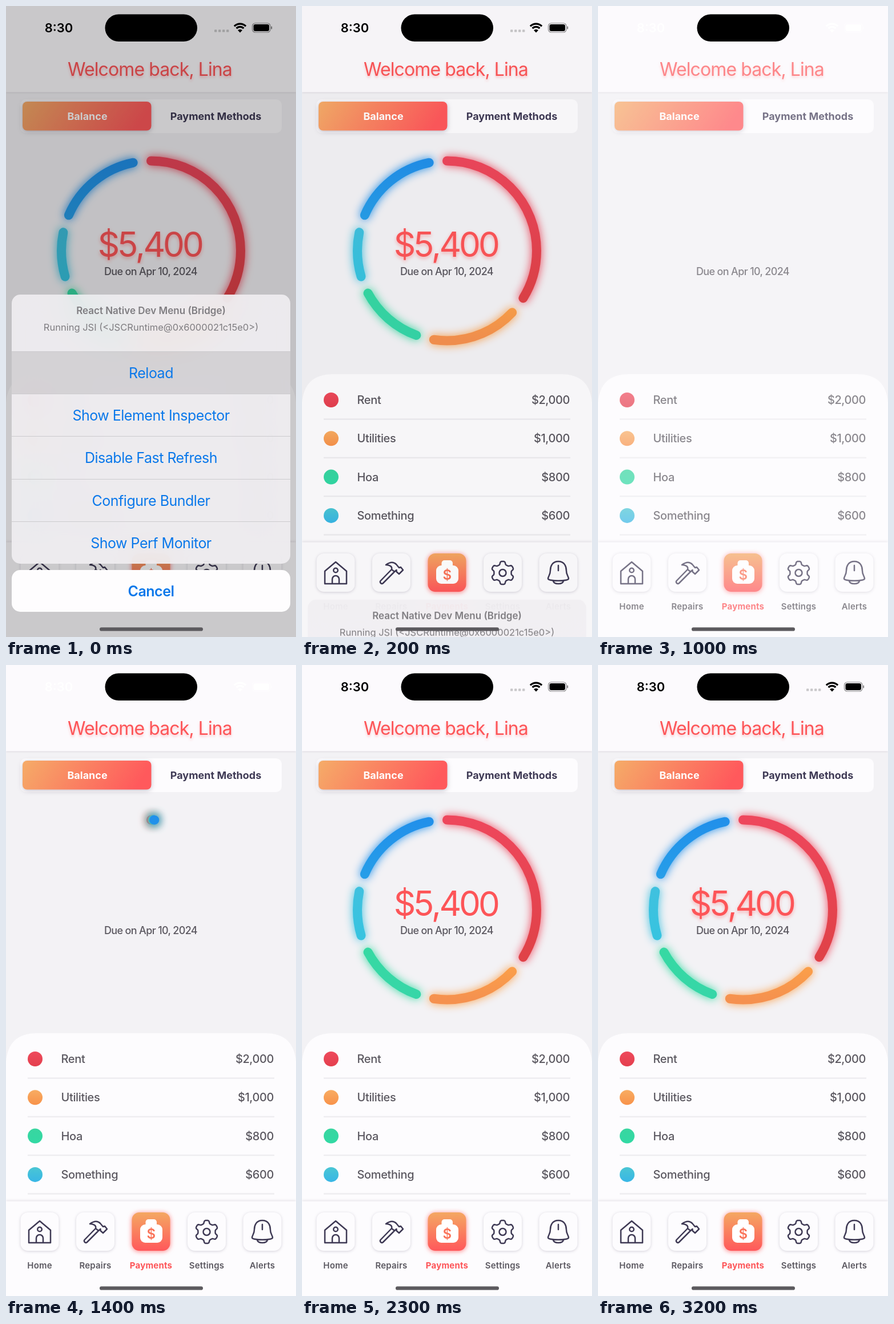
Write an HTML page that moves like this. It is 508 px wide and 1102 px high and loops after 3400 ms.

```html
<!DOCTYPE html>
<html lang="en">
<head>
<meta charset="utf-8">
<title>Payments</title>
<style>
html, body { margin: 0; width: 100%; height: 100%; overflow: hidden; background: #fdfcfe; }
body, text { font-family: Inter, Roboto, sans-serif; }
svg { position: absolute; left: 0; top: 0; width: 508px; height: 1102px; }
#sheet { position: absolute; left: 10px; top: 504px; width: 488px; text-align: center; }
#menu, #cancel { border-radius: 15px; overflow: hidden; }
#menu { height: 470px; background: rgba(241,239,242,.9); backdrop-filter: blur(26px) saturate(1.5); }
#head { height: 99px; color: #7f7d81; font-size: 16.5px; line-height: 29px; white-space: nowrap; }
#head b { display: block; padding-top: 14px; font-size: 17px; font-weight: 600; }
.row, #cancel { height: 73.2px; line-height: 75px; font-size: 25px; letter-spacing: -.5px; color: #0a78ea; }
.row { border-top: 1px solid #cccbce; }
.row.on { background: rgba(0,0,0,.1); }
#cancel { margin-top: 11px; background: #fefdfe; font-weight: 600; }
</style>
</head>
<body>
<svg id="app" viewBox="0 0 508 1102"></svg>
<div id="sheet">
  <div id="menu">
    <div id="head"><b>React Native Dev Menu (Bridge)</b>Running JSI (&lt;JSCRuntime@0x6000021c15e0&gt;)</div>
    <div class="row on">Reload</div>
    <div class="row">Show Element Inspector</div>
    <div class="row">Disable Fast Refresh</div>
    <div class="row">Configure Bundler</div>
    <div class="row">Show Perf Monitor</div>
  </div>
  <div id="cancel">Cancel</div>
</div>
<svg id="top" viewBox="0 0 508 1102"></svg>
<script>
const LOOP = 3400, RED = '#fd5558', INK = '#3f3a55', GREY = '#5b5860', PAPER = '#fdfcfe';
const $ = id => document.getElementById(id);
const clamp = v => Math.max(0, Math.min(1, v));
const span = (t, start, length) => clamp((t - start) / length);
const inOut = v => v < .5 ? 2 * v * v : 1 - 2 * (1 - v) ** 2;
const easeOut = v => 1 - (1 - v) ** 3;

const text = (x, y, s, size, weight, fill, anchor = 'middle', gap = 0, extra = '') =>
  `<text x="${x}" y="${y}" font-size="${size}" font-weight="${weight}" fill="${fill}" text-anchor="${anchor}" letter-spacing="${gap}" ${extra}>${s}</text>`;
const rect = (x, y, w, h, r, fill, extra = '') =>
  `<rect x="${x}" y="${y}" width="${w}" height="${h}" rx="${r}" fill="${fill}" ${extra}/>`;
const shadow = (y, blur, color) => `style="filter:drop-shadow(0 ${y}px ${blur}px ${color})"`;
const gradient = (id, from, to, dir = 'x2="0" y2="1"', a = 0, b = 1) =>
  `<linearGradient id="${id}" ${dir}><stop offset="${a}" stop-color="${from}"/><stop offset="${b}" stop-color="${to}"/></linearGradient>`;

// name, amount, arc colours with their stops down the ring, dot colours
const bills = [
  ['Rent', 2000, ['#ee475c', '#e04248', 0, .75], ['#ee4a5c', '#e43f4e']],
  ['Utilities', 1000, ['#fb9f49', '#f5914f', .82, 1], ['#f8ac62', '#f8924a']],
  ['Hoa', 800, ['#36d9a2', '#36d6a8', .7, 1], ['#38d6a0', '#32d9a4']],
  ['Something', 600, ['#3fc1df', '#35c4e0', .4, .7], ['#4ac6d4', '#38b6e6']],
  ['', 1000, ['#2190ea', '#28a2e8', 0, .42], null]
];
const total = bills.reduce((sum, b) => sum + b[1], 0), GAP = 11.5;
let turn = 0;
const arcs = bills.map(([, amount]) => {
  const size = 360 * amount / total, arc = { start: turn, length: size - GAP };
  turn += size;
  return arc;
});

// counter columns: centre x and target character
const columns = [[180, '$'], [213.5, '5'], [235.5, ','], [260, '4'], [294, '0'], [328, '0']];
const LINE = 70, BASE = 438;
const counter = columns.map(([x, c]) => {
  const chars = c >= '0' ? [...'0123456789'].slice(0, +c + 1) : [c];
  return `<g class="col">${chars.map((d, k) => text(x, BASE + LINE * k, d, 60, 400, RED)).join('')}</g>`;
}).join('');

let gear = '';
for (let i = 0; i < 120; i++) {
  const a = i * Math.PI / 60, r = 17.6 + 2.6 * Math.tanh(2.2 * Math.cos(6 * a));
  gear += `${i ? 'L' : 'M'}${(351.5 + r * Math.sin(a)).toFixed(1)} ${(990 - r * Math.cos(a)).toFixed(1)}`;
}
const tabs = [
  ['Home', '<path d="M40 1009V987L59 971 78 987V1009ZM53 1009V1001a6 6 0 0 1 12 0V1009"/><circle cx="59" cy="985.5" r="3.8"/>'],
  ['Repairs', '<path d="M157 984L137.5 1004Q136 1006 138 1008Q140 1010 142 1008L162 988M147 976Q158 968 165 975L170 981 173 980 177 985 170 992 165.500 988V985L162 988 157 984Q159 977 147 976Z"/>'],
  ['Payments', `<g stroke="none">${rect(235, 977, 39, 32, 9, '#fff')}${rect(244.5, 968, 19.5, 17, 5, '#fff')}${text(254.3, 1002, '$', 24, 600, '#fa7459')}</g>`],
  ['Settings', `<path d="${gear}Z"/><circle cx="351.5" cy="990" r="6"/>`],
  ['Alerts', '<path d="M449 970c-11 0-14 9-14 16c0 8-4 10-4 14c0 5 36 5 36 0c0-4-4-6-4-14c0-7-3-16-14-16ZM440 1004q1 5 9 5t9-5M449 977v9"/>']
];
const tabBar = tabs.map(([name, icon], i) => {
  const x = 59 + 97.5 * i, on = i === 2;
  return rect(x - 33.5, 956, 67, 67, 13, on ? 'url(#tab)' : PAPER,
      on ? shadow(1, 4, 'rgba(255,85,85,.75)') : shadow(1, 2.5, 'rgba(70,60,90,.22)')) +
    `<g fill="none" stroke="${INK}" stroke-width="2.5" stroke-linejoin="round" stroke-linecap="round">${icon}</g>` +
    text(x, 1054, name, 15, on ? 700 : 600, on ? RED : GREY, 'middle', .2);
}).join('');

const rows = bills.slice(0, 4).map(([name, amount], i) => {
  const y = 688 + 67.3 * i;
  return `<circle cx="51" cy="${y}" r="13" fill="url(#dot${i})"/>` +
    text(96.5, y + 7, name, 20, 500, GREY, 'start', -.35) +
    text(469, y + 7, '$' + amount.toLocaleString('en-US'), 20, 500, GREY, 'end', -.4) +
    rect(38, y + 32.4, 432, 2.4, 0, '#eeedf0');
}).join('');

const ring = bills.map((b, i) =>
  `<path class="arc" d="M254 270.500a157 157 0 0 1 0 314a157 157 0 0 1 0-314" pathLength="360" fill="none"
    stroke="url(#arc${i})" stroke-width="16" stroke-linecap="round" ${shadow(0, 8, b[2][0])}/>`).join('');

$('app').innerHTML = `<defs>
  ${bills.map((b, i) => gradient('arc' + i, b[2][0], b[2][1], 'x2="0" y2="1"', b[2][2], b[2][3]) +
    (b[3] ? gradient('dot' + i, ...b[3]) : '')).join('')}
  ${gradient('tab', '#f4a862', '#ff585b')}${gradient('pill', '#f5ac68', '#ff595c', 'x2="1" y2=".15"')}
  <clipPath id="window"><rect x="150" y="380" width="210" height="71"/></clipPath></defs>
  ${rect(0, 0, 508, 1102, 0, PAPER)}
  <g id="content">
    ${rect(0, 0, 508, 1102, 0, '#f3f2f5')}
    ${rect(0, 0, 508, 150.5, 0, '#fcfafd', shadow(1, 1.5, 'rgba(60,50,80,.13)'))}
    ${text(108, 122, 'Welcome back, Lina', 32, 400, RED, 'start', -.9, shadow(3, 2, 'rgba(255,85,88,.3)'))}
    ${rect(25, 163, 458, 59, 10, PAPER)}
    ${rect(29, 167, 225.5, 50.5, 8, 'url(#pill)', shadow(2, 4, 'rgba(60,50,80,.28)'))}
    ${text(142.5, 199, 'Balance', 18, 700, '#fff')}
    ${text(367.5, 199, 'Payment Methods', 18, 700, INK)}
    ${ring}
    <g clip-path="url(#window)"><g id="count">${counter}</g></g>
    ${text(253.5, 469.500, 'Due on Apr 10, 2024', 18, 500, GREY, 'middle', -.65)}
    <path d="M0 1102V693Q4 643 54 643H454Q504 643 508 693V1102Z" fill="${PAPER}"/>
    ${rows}
    ${rect(0, 936.5, 508, 166, 0, PAPER, shadow(-1, 2, 'rgba(60,50,80,.15)'))}
    ${tabBar}
  </g>
  ${rect(0, 0, 508, 1102, 0, '#000', 'id="dim"')}`;

const wave = r => `M${410 - r * .72} ${45.5 - r * .72}A${r} ${r} 0 0 1 ${410 + r * .72} ${45.5 - r * .72}`;
$('top').innerHTML = `
  <g id="banner">${rect(0, 0, 508, 89, 0, '#2483e7')}${text(254, 82, 'Refreshing...', 15, 400, '#fff', 'middle', .2)}</g>
  ${rect(173.5, 14.5, 161.5, 47.5, 23.75, '#000')}
  <g id="dots" fill-opacity=".2">${[0, 1, 2, 3].map(i => rect(365 + 7 * i, 41.2, 4.4, 4.4, 1.2, '#000')).join('')}</g>
  <g id="status">
    ${text(92.5, 46, '8:30', 22, 600, 'currentColor')}
    <path d="${wave(14)}${wave(8.8)}" fill="none" stroke="currentColor" stroke-width="3.3"/>
    <path d="M410 46.500L406 42.300Q410 39 414 42.300Z" fill="currentColor"/>
    ${rect(431.5, 30, 31.5, 16, 5, 'none', 'stroke="currentColor" stroke-opacity=".45" stroke-width="1.2"')}
    ${rect(433.5, 32, 27.5, 12, 3.2, 'currentColor')}
    ${rect(464.3, 35.5, 1.8, 5, .9, 'currentColor', 'fill-opacity=".5"')}
  </g>
  ${rect(164, 1085.3, 181, 6.2, 3.1, '#5c5a5e')}`;

const arcEls = document.querySelectorAll('.arc'), colEls = document.querySelectorAll('.col');

function draw(t) {
  // developer menu slides away, then the app reloads
  const gone = easeOut(span(t, 60, 270));
  $('sheet').style.display = gone < 1 ? '' : 'none';
  $('sheet').style.transform = `translateY(${598 * gone}px)`;
  $('dim').setAttribute('opacity', .2 * (1 - gone));
  $('content').setAttribute('opacity', t < 500 ? 1 : span(t, 650, 500));

  const loaded = t >= 500;
  const sweep = loaded ? inOut(span(t, 1364, 640)) : 1;
  arcEls.forEach((el, i) => {
    el.style.display = sweep ? '' : 'none';
    el.setAttribute('stroke-dasharray', `${arcs[i].length * sweep} 400`);
    el.setAttribute('stroke-dashoffset', -arcs[i].start * sweep);
  });

  let settled = true;
  colEls.forEach((el, i) => {
    const p = loaded ? inOut(span(t, 1558 + 56.5 * i, 500)) : 1, goal = +columns[i][1] || 0;
    if (p < 1) settled = false;
    el.setAttribute('transform', `translate(0 ${LINE * (1 - (goal + 1) * p)})`);
  });
  $('count').style.filter = settled ? 'drop-shadow(0 3px 3px rgba(255,85,88,.4))' : 'none';

  const light = span(t, 700, 300) * (1 - span(t, 1450, 300)), tone = Math.round(255 * light);
  $('status').style.color = `rgb(${tone},${tone},${tone})`;
  $('dots').setAttribute('opacity', 1 - light);

  const hide = inOut(span(t, 2950, 250));
  $('banner').style.display = t >= 2400 && hide < 1 ? '' : 'none';
  $('banner').setAttribute('transform', `translate(0 ${-89 * hide})`);
}

const begin = performance.now();
function tick() {
  draw((performance.now() - begin) % LOOP);
  requestAnimationFrame(tick);
}
tick();
</script>
</body>
</html>
```
